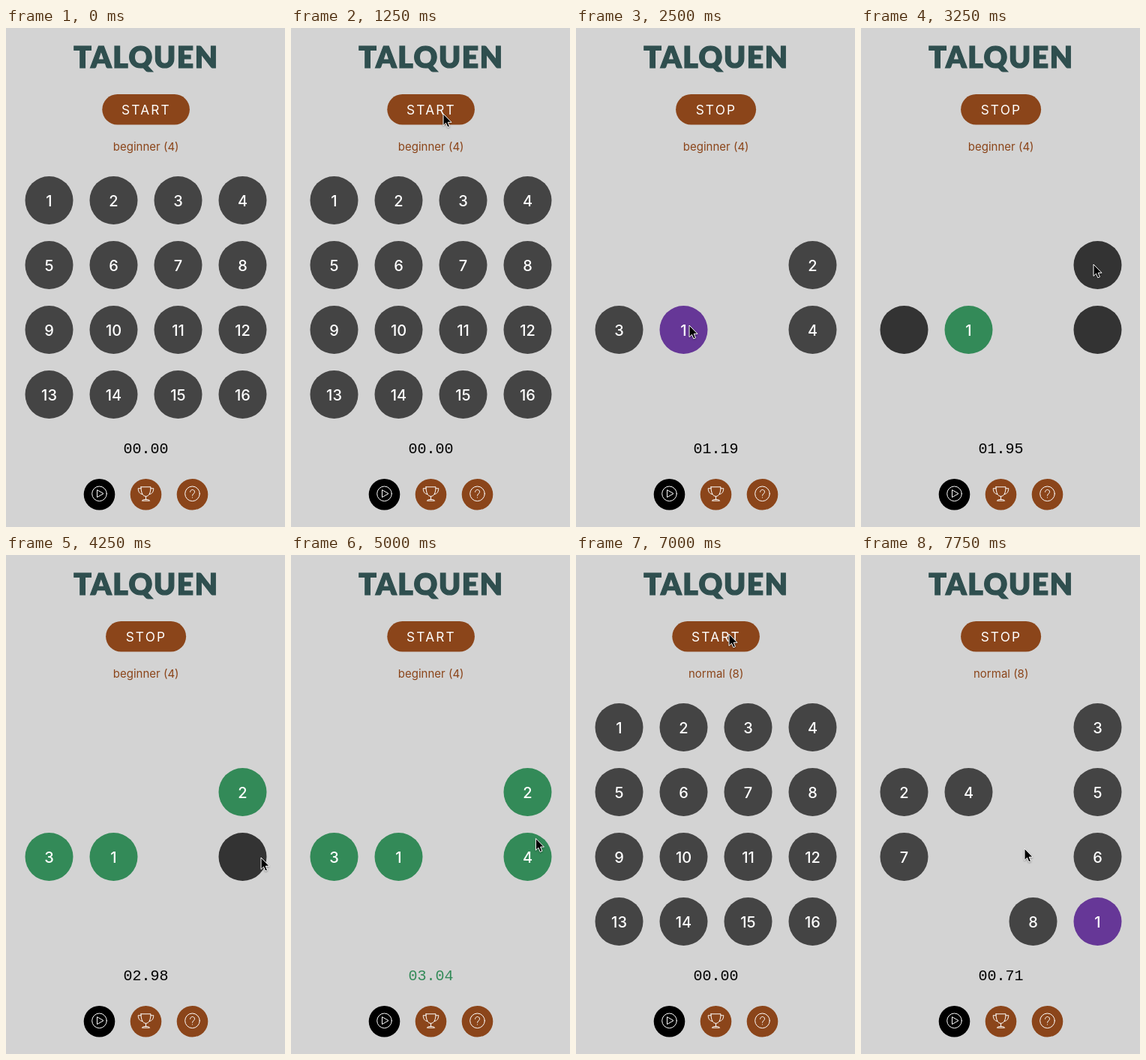
An HTML page for the animation above (8 s loop, 372 by 663 pixels).

```html
<!DOCTYPE html>
<html lang="en">
<head>
<meta charset="utf-8">
<title>Number game</title>
<style>
  html, body { margin: 0; width: 100%; height: 100%; overflow: hidden; background: #d3d3d3; }
  svg { display: block; width: 372px; height: 663px; }
  text { font-family: Inter, sans-serif; text-anchor: middle; }
  .title { font: 900 39px Lato, sans-serif; letter-spacing: 1.6px; fill: #2f4f4f; stroke: #2f4f4f; stroke-width: 1.2; }
  .action { font-size: 17.3px; letter-spacing: 2.2px; fill: #fff; }
  .level { font-size: 15px; fill: #8b451a; }
  .num { font-size: 20px; font-weight: 500; fill: #fff; }
  .clock { font: 20px "Liberation Mono", monospace; }
  .icon { fill: none; stroke: #fff; stroke-linejoin: round; stroke-linecap: round; }
  #cursor { filter: drop-shadow(0 1px 1px rgba(0, 0, 0, .35)); }
</style>
</head>
<body>
<svg viewBox="0 0 372 663">
  <text class="title" x="187" y="53.2">TALQUEN</text>

  <rect id="pill" y="88" height="40.5" rx="20.25" fill="#8b451a"/>
  <text id="action" class="action" x="187" y="114.6"></text>
  <text id="level" class="level" x="186.7" y="162.5"></text>

  <g id="board"></g>
  <text id="clock" class="clock" x="186.5" y="564.8"></text>

  <g id="menu"></g>
  <g class="icon" transform="translate(124.5 618.8)">
    <circle r="9.8"/>
    <path d="M-3 -4.7 V4.7 L5.2 0 Z"/>
  </g>
  <g class="icon" transform="translate(186.5 618.8)">
    <path d="M-6.5 -9 H6.5 C6.5 -1 4 3.5 0 3.5 S-6.5 -1 -6.5 -9 Z
             M-6.4 -7 H-10.3 C-10 -2 -8 .3 -4.8 .6 M6.4 -7 H10.3 C10 -2 8 .3 4.8 .6
             M0 3.5 V7.5 M-5 9 C-4 7 4 7 5 9 Z"/>
  </g>
  <g class="icon" transform="translate(248.5 618.8)">
    <circle r="9.8"/>
    <path d="M-2.9 -2.4 C-2.9 -6.4 3 -6.2 3 -2.5 C3 0 0 0 0 2.4 M0 5 V5.1"/>
  </g>

  <path id="cursor" d="M0 0 V15.6 L3.5 12.3 L5.8 17.8 L8.5 16.7 L6.2 11.3 H11 Z" stroke="#fff"/>
</svg>
<script>
const LOOP = 8000, STEP = 250, PITCH = 86, CENTER = 186.6;
const BROWN = '#8b451a', GREEN = '#338a58', PURPLE = '#663797', GRAY = '#444', BLANK = '#333';

const $ = id => document.getElementById(id);
const set = (el, attrs) => {
  for (const key in attrs) el.setAttribute(key, attrs[key]);
  return el;
};
const add = (parent, name, attrs) =>
  $(parent).appendChild(set(document.createElementNS('http://www.w3.org/2000/svg', name), attrs));

['#000', BROWN, BROWN].forEach((fill, i) =>
  add('menu', 'circle', { cx: 124.5 + i * 62, cy: 619.7, r: 20.8, fill }));

const cells = Array.from({ length: 16 }, (_, i) => {
  const x = 57.5 + i % 4 * PITCH, y = 229 + Math.floor(i / 4) * PITCH;
  return {
    disc: add('board', 'circle', { cx: x, cy: y, r: 32 }),
    label: add('board', 'text', { x, y: y + 7.6, class: 'num' })
  };
});

// order: cells holding 1, 2, 3...; correct taps come at an even pace from firstTap
const rounds = [
  { from: 1500, to: 6250, clockFrom: 1336, firstTap: 2750, order: [9, 7, 8, 11], finalTime: 304 },
  { from: 7250, to: LOOP, clockFrom: 7055, firstTap: LOOP, order: [15, 4, 3, 5, 7, 11, 8, 14] }
];
const TAP_GAP = 583;

// Pointer moves: departure, arrival, x, y
const moves = [
  [250, 1250, 203, 114],
  [1750, 2500, 151, 395],
  [2750, 3250, 310, 314],
  [3250, 4000, 68, 400],
  [4000, 4250, 340, 402],
  [4750, 6000, 209, 158],
  [6000, 6500, 204, 105],
  [7500, 7750, 218, 390]
];

const ease = k => k * k * (3 - 2 * k);

function pointer(t) {
  let x = 376, y = -20;
  for (const [t0, t1, toX, toY] of moves) {
    const k = ease(Math.min(1, Math.max(0, (t - t0) / (t1 - t0))));
    x += (toX - x) * k;
    y += (toY - y) * k;
  }
  return [x, y];
}

function cellLook(i, round, taps) {
  if (!round) return [GRAY, i + 1];
  const n = round.order.indexOf(i);
  if (n < 0) return ['none', ''];
  if (n < taps) return [GREEN, n + 1];
  if (taps) return [BLANK, ''];
  return [n ? GRAY : PURPLE, n + 1];
}

function draw(t) {
  const round = rounds.find(r => t >= r.from && t < r.to);
  const taps = round ? Math.max(0, Math.floor((t - round.firstTap) / TAP_GAP) + 1) : 0;
  const done = !!round && taps >= round.order.length;
  const running = !!round && !done;

  cells.forEach(({ disc, label }, i) => {
    const [fill, text] = cellLook(i, round, taps);
    set(disc, { fill });
    label.textContent = text;
  });

  const width = running ? 107 : 116.6;
  set($('pill'), { x: CENTER - width / 2, width });
  $('action').textContent = running ? 'STOP' : 'START';
  $('level').textContent = t < rounds[0].to ? 'beginner (4)' : 'normal (8)';

  const ticks = done ? round.finalTime : running ? Math.floor((t - round.clockFrom) * .1023) : 0;
  $('clock').textContent = (ticks / 100).toFixed(2).padStart(5, '0');
  set($('clock'), { fill: done ? GREEN : '#000' });

  set($('cursor'), { transform: `translate(${pointer(t)})` });
}

const start = performance.now();
function tick(now) {
  const t = Math.max(0, now - start) % LOOP;
  draw(Math.floor(t / STEP) * STEP);
  requestAnimationFrame(tick);
}
tick(start);
</script>
</body>
</html>
```
